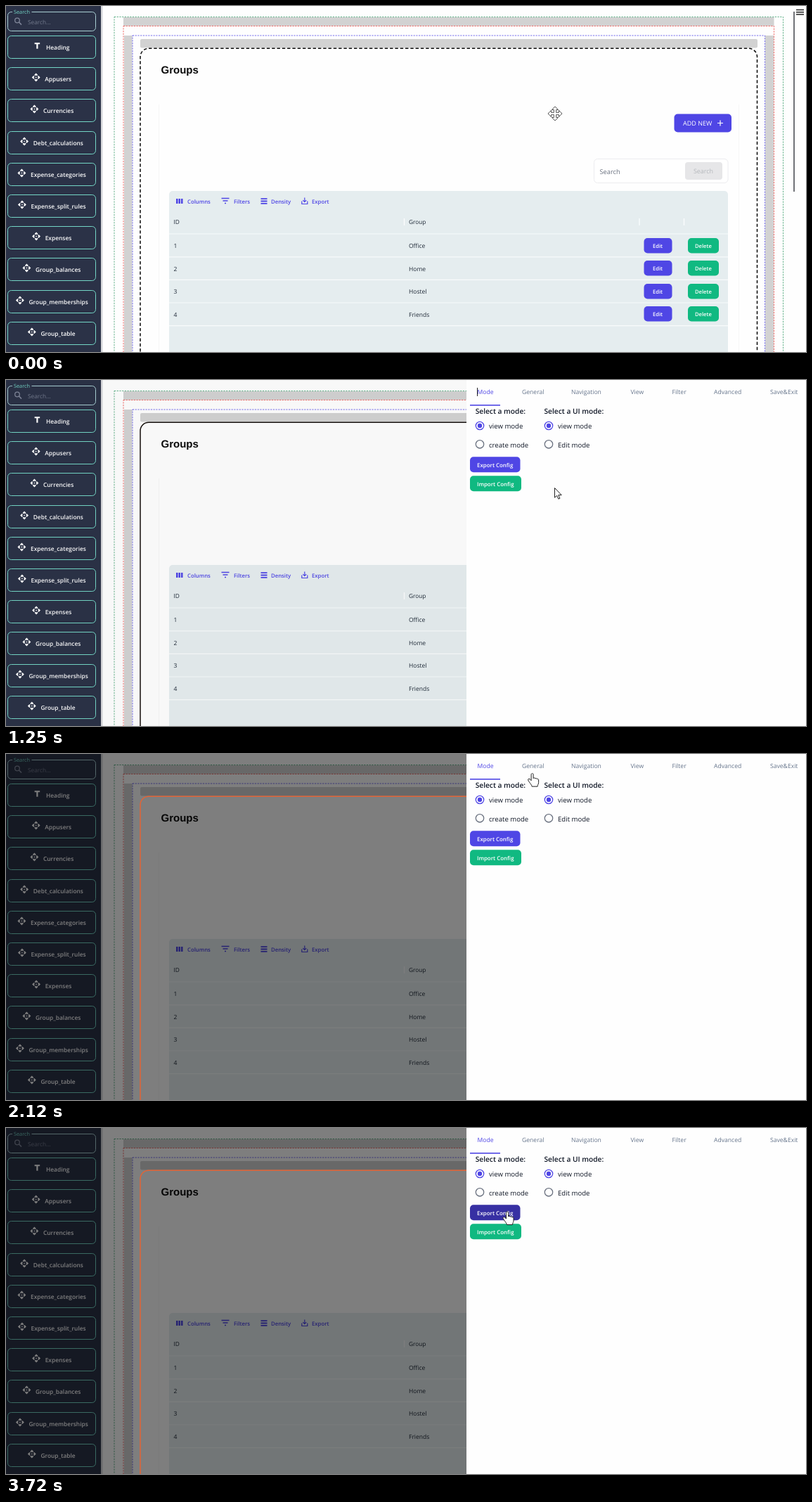
Recreate the animation shown at these times as an HTML page. Size 1138 px wide and 492 px high, loop 3790 ms.

```html
<!DOCTYPE html>
<html lang="en">
<head>
<meta charset="utf-8">
<title>Page builder</title>
<style>
html, body { margin: 0; width: 100%; height: 100%; overflow: hidden; background: #fff; }
svg { display: block; width: 100vw; height: 100vh; font-family: "Open Sans", "Noto Sans", sans-serif; text-rendering: geometricPrecision; }
</style>
</head>
<body>
<svg id="stage" viewBox="0 0 1138 492"></svg>
<script>
const LOOP = 3790;
const INDIGO = '#4f46e5', GREEN = '#10b981', NAVY = '#2b3247', MINT = '#74d6c6', GREY = '#d2d2d2', INK = '#1f2937';
const stage = document.getElementById('stage');

function add(parent, tag, attrs = {}, content) {
  const node = document.createElementNS('http://www.w3.org/2000/svg', tag);
  for (const key in attrs) node.setAttribute(key, attrs[key]);
  if (content !== undefined) node.textContent = content;
  parent.appendChild(node);
  return node;
}
const group = (parent, attrs) => add(parent, 'g', attrs);
const rect = (parent, x, y, width, height, fill, more) => add(parent, 'rect', { x, y, width, height, fill, ...more });
const path = (parent, d, more) => add(parent, 'path', { d, fill: 'none', ...more });
const text = (parent, x, y, content, size, fill, more) =>
  add(parent, 'text', { x, y, 'font-size': size, fill, ...more }, content);
const bold = { 'font-weight': 600 };
const medium = { 'font-weight': 500 };

function button(parent, x, y, w, h, label, labelX, fill, size = 7.6) {
  const box = rect(parent, x, y, w, h, fill, { rx: 5 });
  text(parent, labelX, y + h / 2 + size * 0.42, label, size, '#fff', bold);
  return box;
}

const page = group(stage);

function drawCanvas() {
  rect(page, 0, 0, 1138, 492, '#fefefe');
  rect(page, 167, 16, 925.5, 12.5, GREY);
  rect(page, 168, 42, 11.5, 460, GREY);
  rect(page, 1080, 42, 12, 460, GREY);
  rect(page, 191, 47, 878, 12.5, GREY, { rx: 2 });
  const outlines = [[154, 15.5, 951.5, '#45a374'], [167, 28.5, 925.5, '#f0524f'], [180, 42, 899.5, '#5a52e8']];
  for (const [x, y, w, stroke] of outlines)
    rect(page, x, y, w, 520, 'none', { stroke, 'stroke-width': 0.85, 'stroke-dasharray': '2.2 1.5' });

  path(page, 'M217.5 140V492M1042.5 140V492', { stroke: '#f6f6f6' });
  text(page, 220.5, 96, 'Groups', 15, '#0b0b0b',
    { 'font-family': '"Liberation Sans", Arial, sans-serif', 'font-weight': 700 });

  rect(page, 950.5, 153.5, 81.5, 26, INDIGO, { rx: 5 });
  text(page, 963, 170.3, 'ADD NEW', 9, '#fff', medium);
  path(page, 'M1012 166.5h8M1016 162.5v8', { stroke: '#fff', 'stroke-width': 1.2 });

  rect(page, 836.5, 217.5, 190.5, 34, '#fff', { rx: 5, stroke: '#ececef' });
  text(page, 844.5, 239, 'Search', 9.3, '#6b7280');
  rect(page, 966, 222, 53, 25, '#e6e6e8', { rx: 4 });
  text(page, 978, 238.3, 'Search', 8.9, '#b4b7bc');
}

function drawTable() {
  rect(page, 232, 263, 795, 250, '#e5edef', { rx: 5 });
  const tools = [['Columns', 258], ['Filters', 324], ['Density', 377], ['Export', 435]];
  for (const [label, x] of tools) text(page, x, 280.6, label, 7.75, INDIGO, bold);
  for (const x of [242, 245.5, 249]) rect(page, x, 274, 2.5, 7, INDIGO);
  path(page, 'M306.5 273.5h11M308.5 277h7M311 280.5h2', { stroke: INDIGO, 'stroke-width': 1.3 });
  path(page, 'M362.5 274.2h9M362.5 277.5h9M362.5 280.8h9', { stroke: INDIGO, 'stroke-width': 1.8 });
  path(page, 'M420.8 277.5v4h8v-4M424.8 272.5v6M422.4 276.2l2.4 2.4 2.4-2.4', { stroke: INDIGO, 'stroke-width': 1.2 });

  text(page, 238.5, 310, 'ID', 8.4, INK);
  text(page, 573, 310, 'Group', 8.3, INK);
  path(page, 'M566.5 302v10M901 302v10M964.5 302v10', { stroke: '#fbfdfd', 'stroke-width': 1.3 });
  path(page, 'M232 324H1027', { stroke: '#f8fbfb', 'stroke-width': 1.2 });
  ['Office', 'Home', 'Hostel', 'Friends'].forEach((name, i) => {
    const y = 340.6 + i * 32.6;
    const top = Math.round(y - 11);
    text(page, 238.5, y + 3.4, i + 1, 8.5, INK);
    text(page, 573, y + 3.4, name, 8.5, INK);
    button(page, 907.5, top, 40, 21.5, 'Edit', 920, INDIGO);
    button(page, 970, top, 44, 21.5, 'Delete', 980, GREEN);
    path(page, `M232 ${y + 16.2}H1027`, { stroke: '#f8fbfb', 'stroke-width': 1.2 });
  });
  path(page, 'M1121 8V264', { stroke: '#41434a', 'stroke-width': 1.5 });
  path(page, 'M1124 5.5h11M1124 8.7h11M1124 12h11', { stroke: '#222', 'stroke-width': 1.5 });
}

function drawSidebar() {
  rect(page, 135, 0, 2.5, 492, '#d4d5d9');
  rect(page, 0, 0, 135, 492, NAVY);
  path(page, 'M36.5 8.5H122.5a5 5 0 0 1 5 5V30.5a5 5 0 0 1-5 5H7.5a5 5 0 0 1-5-5V13.5a5 5 0 0 1 5-5H9',
    { stroke: '#a9cfd3' });
  text(page, 11, 10.8, 'Search', 7.3, MINT);
  add(page, 'circle', { cx: 16, cy: 20.5, r: 3.3, fill: 'none', stroke: '#80879a', 'stroke-width': 1.3 });
  path(page, 'M18.4 23l3.6 3.6', { stroke: '#80879a', 'stroke-width': 1.5 });
  text(page, 31, 25.5, 'Search...', 8.3, '#737b8d');

  const items = [['Heading', 57], ['Appusers', 55.3], ['Currencies', 53], ['Debt_calculations', 38.7],
    ['Expense_categories', 35], ['Expense_split_rules', 35.5], ['Expenses', 55.7], ['Group_balances', 42],
    ['Group_memberships', 32.5], ['Group_table', 49.4]];
  items.forEach(([label, x], i) => {
    const y = 58.5 + Math.round(i * 45.2);
    rect(page, 2.5, y - 16, 125, 32, 'none', { rx: 5, stroke: MINT });
    text(page, x, y + 3.6, label, 8.4, '#fff', bold);
    const icon = group(page, { transform: `translate(${x - 12.6} ${y - 2}) scale(.54)`, fill: '#fff' });
    if (!i) {
      add(icon, 'path', { d: 'M-7-8H7v4H2V8H-2V-4H-7z' });
      return;
    }
    add(icon, 'path', { d: 'M0-2L2 0 0 2-2 0z' });
    for (let turn = 0; turn < 360; turn += 90)
      add(icon, 'path', { d: 'M0-6L2.1-3.9 4.6-6.4 0-11-4.6-6.4-2.1-3.9z', transform: `rotate(${turn})` });
  });
}

drawCanvas();
drawTable();
drawSidebar();

const shade = rect(stage, 0, 0, 1138, 492, '#000');
const frame = rect(stage, 191, 60.3, 877.5, 520, 'none', { rx: 12, 'stroke-width': 1.5 });

const drawer = group(stage);
rect(drawer, 655, 0, 483, 492, '#fefefe');
const tabs = [['Mode', 670.5], ['General', 734], ['Navigation', 804], ['View', 888.5], ['Filter', 947.5],
  ['Advanced', 1007], ['Save&Exit', 1087]];
tabs.forEach(([label, x], i) => text(drawer, x, 20.2, label, 8.6, i ? '#65748b' : INDIGO, i ? {} : medium));
rect(drawer, 660, 35, 43, 1.6, INDIGO);
const caret = rect(drawer, 670, 11, 1, 12, '#222');

function radioSet(x, titleX, title, options) {
  text(drawer, titleX, 48.2, title, 10.2, '#111827', bold);
  options.forEach((label, i) => {
    const y = 65 + i * 26.3;
    add(drawer, 'circle', { cx: x, cy: y, r: 5.7, fill: 'none', stroke: i ? '#6b7280' : INDIGO, 'stroke-width': 1.3 });
    if (!i) add(drawer, 'circle', { cx: x, cy: y, r: 3.2, fill: INDIGO });
    text(drawer, x + 13, y + 4.2, label, 9.6, '#111827');
  });
}
radioSet(674, 667.7, 'Select a mode:', ['view mode', 'create mode']);
radioSet(772, 765.5, 'Select a UI mode:', ['view mode', 'Edit mode']);
const exportButton = button(drawer, 660, 109.3, 71.5, 22, 'Export Config', 670, INDIGO, 7.9);
button(drawer, 660, 136.2, 73, 22, 'Import Config', 670, GREEN, 7.9);

const pointerStyle = { fill: '#fff', stroke: '#222', 'stroke-width': 1, 'stroke-linejoin': 'round' };
const corner = (a, b) => `L${a(0, -10)} ${a(4.6, -5.5)} ${a(1.6, -5.5)} ${a(1.6, -1.6)} ${b}`;
const quarters = [(x, y) => `${x},${y}`, (x, y) => `${-y},${x}`, (x, y) => `${-x},${-y}`, (x, y) => `${y},${-x}`];
const moveShape = 'M0,-10' + quarters.map(q => corner(q, `${q(5.5, -1.6)} ${q(5.5, -4.6)}`)).join('') + 'z';
const pointers = {
  move: path(stage, moveShape, { ...pointerStyle, stroke: '#444', 'stroke-width': 0.9 }),
  arrow: path(stage, 'M.5.5V14.2l3.2-2.9 2.2 4.9 2-.9-2.1-4.7h4.4z', pointerStyle),
  hand: path(stage, 'M-1.5-.5c0-2 3-2 3 0V5c.5-1.2 2.6-1 2.7.4.7-1 2.4-.7 2.5.6.9-.7 2.3-.2 2.3 1.1V11c0 2-1.5 3-1.5 5.5H-.5C-.8 14-3 12.5-4.5 9.8-5.8 7.6-6.6 6.8-5.6 6c1.3-1 2.8.3 4.1 2.1z', pointerStyle)
};
const glow = add(stage, 'circle', { r: 10.7, fill: '#faf500', opacity: 0.6 });

const moves = [
  { start: 1710, end: 2190, steps: 8, from: [780, 153], bend: [766, 90], to: [747, 24] },
  { start: 2250, end: 2710, steps: 8, from: [747, 24], bend: [705, -30], to: [715.5, 108] },
  { start: 2780, end: 3060, steps: 5, from: [715.5, 108], bend: [715, 116], to: [713, 121] }
];

function pointerAt(t) {
  if (t < 1220) return [781, 153];
  let spot = moves[0].from;
  for (const { start, end, steps, from, bend, to } of moves) {
    if (t < start) break;
    const step = Math.floor((t - start) / (end - start) * (steps - 1) + 0.01) + 1;
    const linear = Math.min(step / steps, 1);
    const u = linear * linear * (3 - 2 * linear);
    spot = from.map((a, i) => a * (1 - u) ** 2 + 2 * bend[i] * u * (1 - u) + to[i] * u * u);
  }
  return spot;
}

const clamp = v => Math.max(0, Math.min(1, v));

// cubic-bezier(.4, 0, .2, 1)
function ease(x) {
  let low = 0, high = 1;
  for (let i = 0; i < 20; i++) {
    const s = (low + high) / 2;
    const bx = 1.2 * s * (1 - s) ** 2 + 0.6 * s * s * (1 - s) + s ** 3;
    if (bx < x) low = s; else high = s;
  }
  return 3 * low * low * (1 - low) + low ** 3;
}

const mix = (a, b, k) => `rgb(${a.map((v, i) => Math.round(v + (b[i] - v) * k))})`;
const show = (node, visible) => node.setAttribute('display', visible ? 'inline' : 'none');

function render(t) {
  const sampled = 1108 + Math.floor((t - 1108) / 71) * 71;
  const open = sampled >= 1220;
  const fade = ease(clamp((sampled - 1220) / 225));
  shade.setAttribute('opacity', fade * 0.5);
  frame.setAttribute('stroke', mix([8, 8, 8], [226, 100, 54], fade));
  frame.setAttribute('stroke-dasharray', open ? 'none' : '4.4 2.9');
  show(drawer, open);
  show(caret, t < 1710 || (t >= 2250 && t < 2780));
  exportButton.setAttribute('fill', mix([79, 70, 229], [55, 48, 163], ease(clamp((t - 2715) / 250))));

  const [x, y] = pointerAt(t);
  const onLink = y < 35 || (y > 57 && x < 745);
  const kind = !open ? 'move' : onLink ? 'hand' : 'arrow';
  for (const name in pointers) show(pointers[name], name === kind);
  pointers[kind].setAttribute('transform', `translate(${x} ${y})`);
  glow.setAttribute('cx', x);
  glow.setAttribute('cy', y);
  show(glow, (t >= 1110 && t < 1180) || (t >= 3470 && t < 3580));
}

const begin = performance.now();
function tick() {
  render((performance.now() - begin) % LOOP);
  requestAnimationFrame(tick);
}
tick();
</script>
</body>
</html>
```
